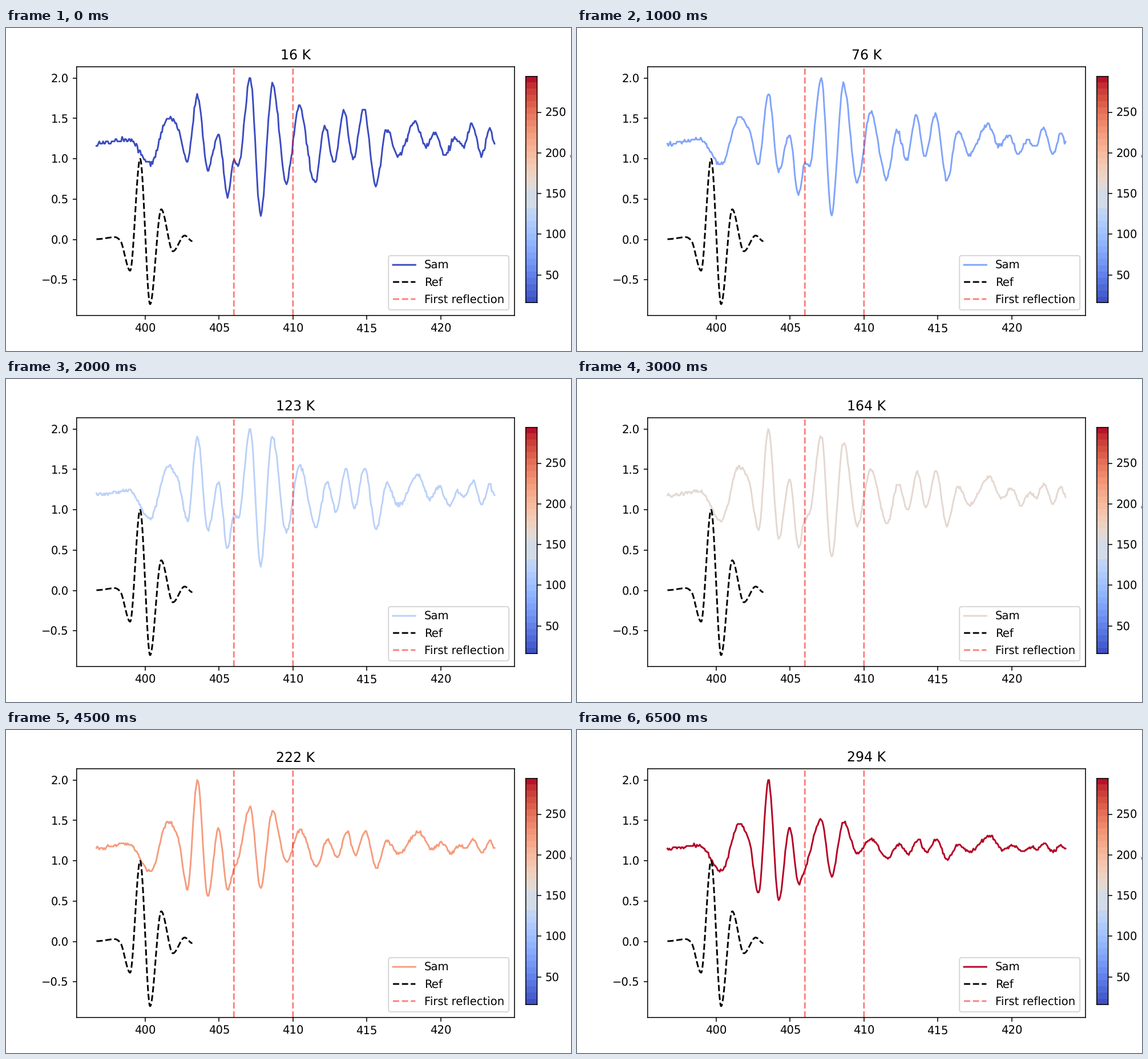
Recreate the animation shown at these times as a matplotlib script. Size 990 by 566 pixels, loop 7000 ms.

```python
import numpy as np
import matplotlib.pyplot as plt
from matplotlib.animation import FuncAnimation
from matplotlib.lines import Line2D

W, H, DPI = 990, 566, 141.5
TEMPS = [16, 46, 76, 100, 123, 144, 164, 183, 203, 222, 240, 258, 276, 294]
T_MIN, T_MAX = TEMPS[0], TEMPS[-1]
XLIM = (395.353, 424.998)
YLIM = (-0.94, 2.14)
BASE, WARM_BASE = 1.18, 1.15

plt.rcParams.update({"path.snap": False, "text.hinting": "none"})
cmap = plt.get_cmap("coolwarm")


def to_time(px):
    """Horizontal stage position to axis units."""
    return XLIM[0] + (px - 0.125 * W) / (0.775 * W) * (XLIM[1] - XLIM[0])


def bump(x, mid, width):
    return np.exp(-((x - mid) / width) ** 2)


def smooth(x, xk, yk):
    """Monotone cubic through the knots, flat at every extremum."""
    h = np.diff(xk)
    d = np.diff(yk) / h
    m = np.zeros(len(xk))
    a, b = d[:-1], d[1:]
    same = a * b > 0
    m[1:-1][same] = 2 * a[same] * b[same] / (a[same] + b[same])
    i = np.clip(np.searchsorted(xk, x) - 1, 0, len(h) - 1)
    t = (x - xk[i]) / h[i]
    return ((1 + 2 * t) * (1 - t) ** 2 * yk[i] + t * (1 - t) ** 2 * h[i] * m[i]
            + t * t * (3 - 2 * t) * yk[i + 1] + t * t * (t - 1) * h[i] * m[i + 1])


# turning points of the main pulse: position, cold height, warm height
pulse = np.array([
    (158.5, 1.19, 1.15), (215, 1.24, 1.19), (253, .94, .87), (284, 1.51, 1.45),
    (301, 1.38, 1.27), (318, .97, .59), (335.5, 1.79, 2), (353.5, .87, .51),
    (372.5, 1.29, 1.41), (388.5, .54, .72), (399, .97, .88), (407, .91, 1.08),
    (428, 2, 1.52), (446, .31, .81), (467, 1.92, 1.48), (491, .70, 1.09)])
# turning points of the later echoes: position, cold height
echo = np.array([
    (514, 1.65), (541, .70), (559, 1.40), (575, .95), (592, 1.61), (608, 1.0),
    (627, 1.63), (648, .67), (667, 1.37), (687, 1.04), (717, 1.45), (736, 1.16),
    (752, 1.32), (769, 1.04), (787, 1.25), (801, 1.16), (817, 1.42), (833, 1.05),
    (848, 1.36), (856, 1.19)])

# echoes fade as they warm, except for one packet, and slide to later times
fade = 0.25 + 0.45 * bump(echo[:, 0], 725, 15)
warm_echo = WARM_BASE + (echo[:, 1] - BASE) * fade
slide = 13 * bump(echo[:, 0], 755, 45) + 6 * bump(echo[:, 0], 580, 50)

px = np.linspace(158.5, 856, 420)


def signal(k):
    """Sampled signal of step k, scaled to peak at 2, in coarse detector steps."""
    u = (TEMPS[k] - T_MIN) / (T_MAX - T_MIN)
    v = u ** 1.3
    v = v * v * (3 - 2 * v)
    base = BASE + (WARM_BASE - BASE) * u
    xk = np.r_[pulse[:, 0], echo[:, 0] + slide * (1 - (1 - u) ** 2)]
    yk = np.r_[pulse[:, 1] + (pulse[:, 2] - pulse[:, 1]) * v,
               echo[:, 1] + (warm_echo - echo[:, 1]) * u]
    yk = base + (yk - base) * (2 - base) / (yk.max() - base)
    step = 0.028 - 0.012 * u
    rng = np.random.default_rng(40 + k)
    y = smooth(px, xk, yk) + rng.normal(0, 0.55 * step, px.size)
    return np.minimum(2 - step * np.round((2 - y) / step), 2)


fig = plt.figure(figsize=((W + 0.001) / DPI, (H + 0.001) / DPI), dpi=DPI, facecolor="white")
ax = fig.add_axes([0.125, 0.11, 0.775, 0.77])
ax.set(xlim=XLIM, ylim=YLIM, xticks=range(400, 421, 5), yticks=np.arange(-0.5, 2.1, 0.5))

sam, = ax.plot(to_time(px), signal(0), color=cmap(0.0), label="Sam")

ref = np.array([(158.5, .005), (191, .03), (200, -.01), (217.5, -.385), (235, 1),
                (252.5, -.8), (272, .375), (292.5, -.145), (313, .05), (326.5, -.02)])
ref_x = np.linspace(ref[0, 0], ref[-1, 0], 300)
ax.plot(to_time(ref_x), smooth(ref_x, *ref.T), "k--", label="Ref")

ax.axvline(406, color="red", ls="--", alpha=0.5, label="First reflection")
ax.axvline(410, color="red", ls="--", alpha=0.5)
legend = ax.legend(loc="lower right", labelspacing=0.54)
key = legend.get_lines()[0]
title = ax.set_title("16 K")

# stepped colour scale, with one wider step just below the middle
bar = fig.add_axes([0.92, 0.15, 0.02, 0.7])
edges = np.delete(np.linspace(0, 1, 37), [16, 17])
for lo, hi in zip(edges[:-1], edges[1:]):
    span = T_MAX - T_MIN
    bar.axhspan(T_MIN + lo * span, T_MIN + hi * span, color=cmap((lo + hi) / 2),
                lw=0, snap=True)
bar.set(xlim=(0, 1), ylim=(T_MIN, T_MAX), xticks=[], yticks=range(50, 251, 50))
bar.yaxis.tick_right()

# sliver of the scale's label that reaches past the right edge
fig.add_artist(Line2D([1 - 0.2 / W, 1 - 1.2 / W], [1 - 227 / H, 1 - 223 / H],
                      color="0.3", lw=0.5))


def update(k):
    color = cmap((TEMPS[k] - T_MIN) / (T_MAX - T_MIN))
    sam.set_ydata(signal(k))
    sam.set_color(color)
    key.set_color(color)
    title.set_text(f"{TEMPS[k]} K")
    return sam, key, title


anim = FuncAnimation(fig, update, frames=len(TEMPS), interval=500,
                     repeat=True, repeat_delay=0, blit=False)
plt.show()
```
